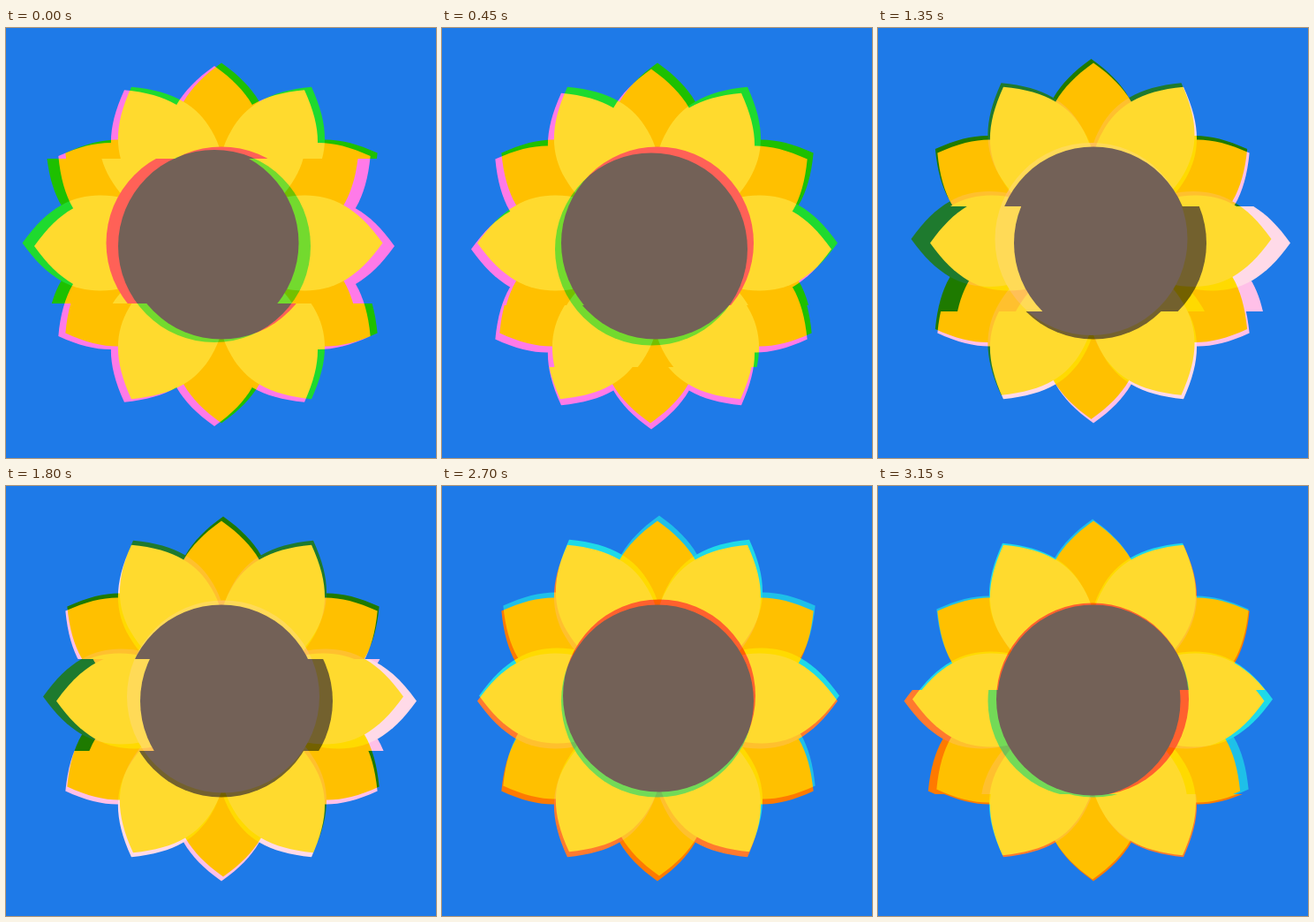
Recreate the animation shown at these times as an HTML page with a canvas. Size 487 by 487 pixels, loop 3250 ms.

```html
<!DOCTYPE html>
<html lang="en">
<head>
<meta charset="utf-8">
<title>Sunflower glitch</title>
<style>
  html, body { margin: 0; width: 100%; height: 100%; overflow: hidden; background: #1e7ae8; }
  canvas { display: block; width: 100vw; height: 100vh; }
</style>
</head>
<body>
<canvas id="stage" width="487" height="487"></canvas>
<script>
const SIZE = 487, LOOP = 3250, STEP = 450;
const CENTER = { x: 244, y: 243.5 }, DISC_RADIUS = 109;
const COLORS = {
  sky: [30, 122, 232],
  back: [255, 192, 0],
  front: [255, 218, 46],
  disc: [115, 97, 87]
};

// Each pose moves one colour channel; slices [top, bottom, dx] displace the other two.
const POSES = [
  { channel: 0, x: -8, y: 3.5, slices: [[148, 312, -21.5]] },
  { channel: 0, x: -7, y: 7, slices: [[314, 384, -2], [384, SIZE, -8]] },
  { channel: 2, x: 6.5, y: 6, slices: [[283, 329, -8]] },
  { channel: 2, x: -2.5, y: -4.5, slices: [[202, 321, 19]] },
  { channel: 2, x: 2, y: -5, slices: [[196, 300, 17]] },
  { channel: 1, x: 8, y: 6, slices: [] },
  { channel: 1, x: 2, y: -6, slices: [] },
  { channel: 1, x: -1, y: -2, slices: [[231, 349, -10.5]] }
];

const stage = document.getElementById('stage').getContext('2d');
const layer = document.createElement('canvas').getContext('2d');
layer.canvas.width = layer.canvas.height = SIZE;

const petal = new Path2D(
  'M204 0 C175 41 147 54 116 54 C106 54 98 53 90 51 L0 0 ' +
  'L90 -51 C98 -53 106 -54 116 -54 C147 -54 175 -41 204 0 Z'
);

function channelColor(name, channel) {
  const rgb = [0, 0, 0];
  rgb[channel] = COLORS[name][channel];
  return `rgb(${rgb})`;
}

function drawPetals(name, channel, firstAngle) {
  layer.fillStyle = channelColor(name, channel);
  for (let i = 0; i < 6; i++) {
    layer.save();
    layer.rotate((firstAngle + i * 60) * Math.PI / 180);
    layer.fill(petal);
    layer.restore();
  }
}

function drawFlower(channel, dx, dy, top = 0, bottom = SIZE) {
  layer.save();
  layer.beginPath();
  layer.rect(0, top, SIZE, bottom - top);
  layer.clip();
  layer.fillStyle = channelColor('sky', channel);
  layer.fillRect(0, 0, SIZE, SIZE);
  layer.translate(CENTER.x + dx, CENTER.y + dy);
  drawPetals('back', channel, 30);
  drawPetals('front', channel, 0);
  layer.fillStyle = channelColor('disc', channel);
  layer.beginPath();
  layer.arc(0, 0, DISC_RADIUS, 0, Math.PI * 2);
  layer.fill();
  layer.restore();
}

function drawPose(pose) {
  stage.globalCompositeOperation = 'source-over';
  stage.fillStyle = '#000';
  stage.fillRect(0, 0, SIZE, SIZE);
  stage.globalCompositeOperation = 'lighter';
  for (let channel = 0; channel < 3; channel++) {
    if (channel === pose.channel) {
      drawFlower(channel, pose.x, pose.y);
    } else {
      drawFlower(channel, 0, 0);
      for (const [top, bottom, dx] of pose.slices) drawFlower(channel, dx, 0, top, bottom);
    }
    stage.drawImage(layer.canvas, 0, 0);
  }
}

const start = performance.now();
let shown = -1;

function tick() {
  const time = (performance.now() - start) % LOOP;
  const index = Math.floor(time / STEP);
  if (index !== shown) {
    shown = index;
    drawPose(POSES[index]);
  }
  requestAnimationFrame(tick);
}
tick();
</script>
</body>
</html>
```
